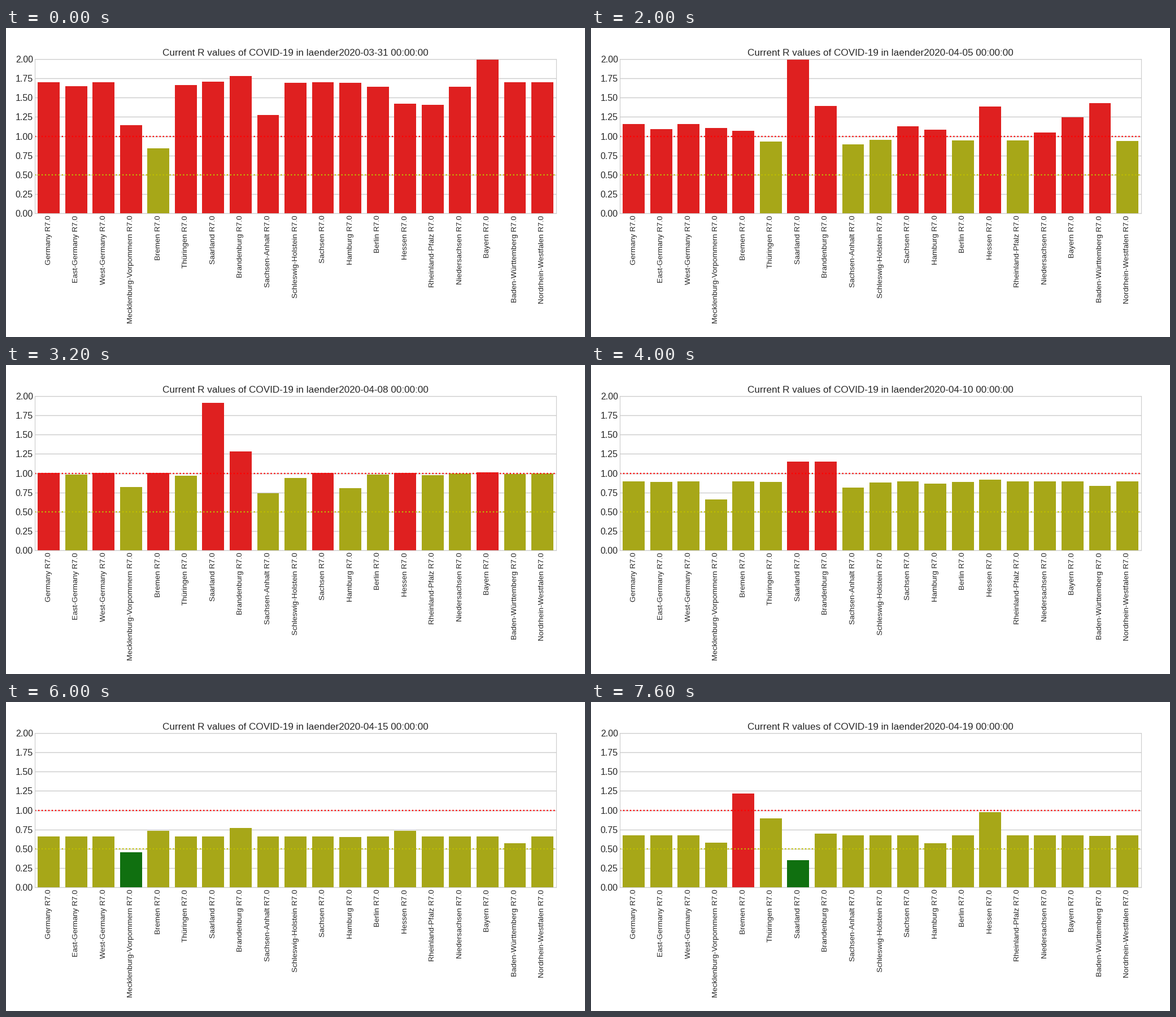
Write a matplotlib script that moves like this. It is 1025 by 547 pixels and loops after 8 s.

```python
import matplotlib.pyplot as plt
import numpy as np
from matplotlib.animation import FuncAnimation

W, H, DPI = 1025, 547, 64
PX = 72 / DPI  # points per pixel
DAYS = np.arange(20)
INK, GREY = "#262626", "#cccccc"
RED, OLIVE, GREEN = "#df2020", "#a7a718", "#107010"

# Nationwide R value, linear between a few key days
TREND = np.interp(DAYS, [0, 3, 5, 8, 13, 17, 19],
                  [1.70, 1.32, 1.155, 1.003, .725, .60, .675])

# Local waves around the trend: (peak day, height, spread in days)
WAVES = {
    "Germany": [],
    "East-Germany": [(3, -.08, 3)],
    "West-Germany": [],
    "Mecklenburg-Vorpommern": [(0, -.55, 1), (3, .35, 1), (12, -.25, 5)],
    "Bremen": [(1, -1, 1.8), (19, .54, 2)],
    "Thüringen": [(4, -.25, 2), (19, .22, 1)],
    "Saarland": [(6.5, 1.2, 2), (19, -.32, 1.2)],
    "Brandenburg": [(8, .28, 5)],
    "Sachsen-Anhalt": [(0, -.42, 1), (6.5, -.35, 2)],
    "Schleswig-Holstein": [(5, -.2, 2)],
    "Sachsen": [(3, -.19, 1)],
    "Hamburg": [(3, -.5, 1), (8, -.2, 1), (18, -.15, 1.2)],
    "Berlin": [(3.5, -.28, 2)],
    "Hessen": [(1, -.35, 1.5), (5, .24, 1), (13, .18, 1.5), (19, .3, 1)],
    "Rheinland-Pfalz": [(0, -.29, 1.5), (5, -.21, 1.5)],
    "Niedersachsen": [(3, -.18, 2)],
    "Bayern": [(0, .35, 3)],
    "Baden-Württemberg": [(4.5, .3, 1.2), (13, -.12, 2.5)],
    "Nordrhein-Westfalen": [(5, -.22, 1.2)],
}


def wave(peak, height, spread):
    return height * np.exp(-.5 * ((DAYS - peak) / spread) ** 2)


def color(r):
    return RED if r > 1 else OLIVE if r > .5 else GREEN


VALUES = np.array([TREND + sum(wave(*w) for w in waves)
                   for waves in WAVES.values()])
N = len(WAVES)

plt.rcParams["font.family"] = "Liberation Sans"
plt.rcParams["text.color"] = INK

fig = plt.figure(figsize=(W / DPI, H / DPI), dpi=DPI, facecolor="white")
left, right, top, bottom = 51.3, 973.75, 55, 328.1
ax = fig.add_axes([left / W, 1 - bottom / H,
                   (right - left) / W, (bottom - top) / H])
ax.set_axisbelow(True)
ax.grid(axis="y", color=GREY, lw=1.4 * PX)
for spine in ax.spines.values():
    spine.set(color=GREY, linewidth=1.14 * PX)

bars = ax.bar(range(N), VALUES[:, 0], width=.8, lw=0)
for level, shade in ((1, "r"), (.5, "y")):
    ax.axhline(level, color=shade, ls=":", lw=2.25 * PX)

ax.set_xlim(-.5, N - .5)
ax.set_ylim(0, 2)
ax.set_yticks(np.arange(0, 2.01, .25))
ax.yaxis.set_major_formatter("{x:.2f}")
ax.set_xticks(range(N), [s + " R7.0" for s in WAVES], rotation=90)
ax.tick_params(length=0, pad=3.5 * PX, labelcolor=INK)
ax.tick_params(axis="x", labelsize=13.45 * PX)
ax.tick_params(axis="y", labelsize=16 * PX)
title = ax.set_title("", fontsize=17.1 * PX, pad=6 * PX)


def update(day):
    date = f"2020-04-{day:02d}" if day else "2020-03-31"
    title.set_text(f"Current R values of COVID-19 in laender{date} 00:00:00")
    for bar, r in zip(bars, VALUES[:, day]):
        bar.set_height(r)
        bar.set_facecolor(color(r))
    return [title, *bars]


anim = FuncAnimation(fig, update, frames=len(DAYS), interval=400,
                     repeat=True, repeat_delay=0)
plt.show()
```
